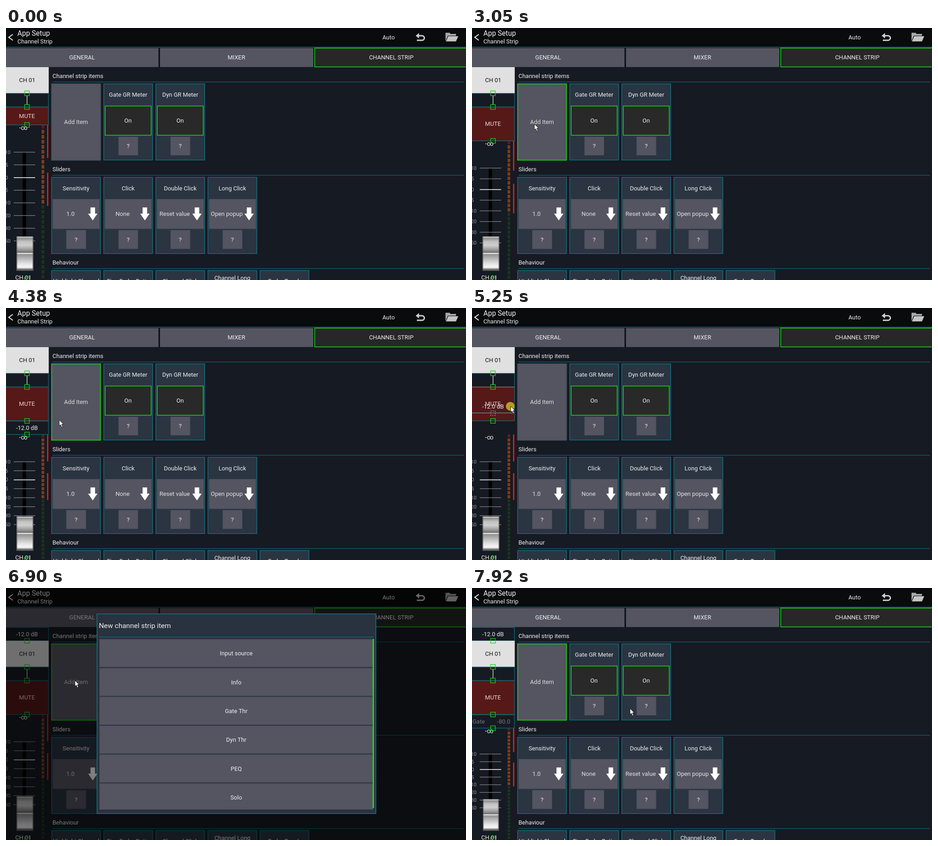
An HTML page with a canvas for the animation above (8 s loop, 1010 by 554 pixels).

```html
<!DOCTYPE html>
<html lang="en">
<head>
<meta charset="utf-8">
<title>Channel strip setup</title>
<style>
html, body { margin: 0; width: 100%; height: 100%; overflow: hidden; background: #161a22; }
canvas { display: block; }
</style>
</head>
<body>
<canvas id="stage" width="1010" height="554"></canvas>
<script>
const ctx = document.getElementById('stage').getContext('2d');
const LOOP = 8000;
const BG = '#161a22', TEAL = '#11707f', GREEN = '#14d514', BUTTON = '#555461', CARD = '#2b3441', WHITE = '#f0f0f0';

// [time, x, y] of the pointer tip
const POINTER = [
  [290, 790, 497], [690, 345, 327], [1080, 55, 216], [1160, 52, 215], [1310, 46, 213], [1550, 47, 213],
  [1790, 48, 220], [2190, 48, 248], [2340, 48, 248], [2730, 137, 211], [3200, 137, 211],
  [3680, 795, 253], [3980, 795, 253], [4380, 117, 246], [4620, 85, 264], [4860, 85, 264],
  [5480, 85, 188], [5880, 85, 101], [6190, 85, 101], [6350, 108, 155], [6580, 151, 203],
  [6900, 151, 203], [7530, 347, 265]
];
const MUTE_BOTTOM = [[1550, 213], [1790, 219.5], [2190, 248]];
const PRESSED = [[1550, 2260], [2970, 3050], [3830, 3910], [4700, 6190], [6740, 6900], [7690, 7770]];
const ROWS = ['Input source', 'Info', 'Gate Thr', 'Dyn Thr', 'PEQ', 'Solo'];
const ROWS_WITH_GAIN = ['Input source', 'Info', 'Gain', 'Gate Thr', 'Dyn Thr', 'PEQ'];

const within = (t, a, b) => t >= a && t < b;

function track(keys, t) {
  if (t <= keys[0][0]) return keys[0].slice(1);
  for (let i = 1; i < keys.length; i++) {
    const [a, b] = [keys[i - 1], keys[i]];
    if (t < b[0]) {
      const k = (t - a[0]) / (b[0] - a[0]);
      return a.slice(1).map((v, j) => v + (b[j + 1] - v) * k);
    }
  }
  return keys[keys.length - 1].slice(1);
}

function fill(x, y, w, h, color) {
  ctx.fillStyle = color;
  ctx.fillRect(x, y, w, h);
}

function box(x, y, w, h, color, border, lw = 1.4) {
  if (color) fill(x, y, w, h, color);
  if (!border) return;
  ctx.strokeStyle = border;
  ctx.lineWidth = lw;
  ctx.strokeRect(x + lw / 2, y + lw / 2, w - lw, h - lw);
}

// y is the middle of the capitals
function text(s, x, y, align = 'center', color = WHITE, size = 13) {
  ctx.font = `${size}px Roboto, sans-serif`;
  ctx.textAlign = align;
  ctx.fillStyle = color;
  ctx.fillText(s, x, Math.round(y + size * 0.355));
}

function shape(points, color) {
  ctx.beginPath();
  points.forEach(([x, y]) => ctx.lineTo(x, y));
  ctx.closePath();
  ctx.fillStyle = color;
  ctx.fill();
}

function header() {
  fill(0, 0, 1010, 42, '#0a0b0d');
  ctx.strokeStyle = WHITE;
  ctx.lineWidth = 2;
  ctx.beginPath();
  ctx.moveTo(15, 14); ctx.lineTo(6, 20.5); ctx.lineTo(15, 27);
  ctx.stroke();
  text('App Setup', 25, 11.9, 'left', WHITE, 15.6);
  text('Channel Strip', 25, 29.5, 'left');
  text('Auto', 840, 20.5);

  shape([[899.5, 17], [907, 11], [907, 23]], '#d0d0d0');
  ctx.strokeStyle = '#d0d0d0';
  ctx.lineWidth = 3;
  ctx.beginPath();
  ctx.moveTo(905, 17); ctx.lineTo(913.5, 17);
  ctx.arc(913.5, 22, 5, -Math.PI / 2, Math.PI / 2);
  ctx.lineTo(902, 27);
  ctx.stroke();

  shape([[965, 29], [965, 10.5], [974, 10.5], [976, 13], [988, 13], [988, 17], [970, 17]], '#a9a9a9');
  shape([[971, 18], [993, 18], [988, 29.5], [966, 29.5]], '#c4c4c4');

  fill(0, 42, 1010, 44, '#0c1016');
  fill(0, 41.5, 1010, 1.5, TEAL);
  box(-2, 44, 337, 42, BUTTON, '#464c58', 1);
  box(338, 44, 337, 42, BUTTON, '#464c58', 1);
  box(677, 43.5, 335, 42.8, '#272727', GREEN, 1.6);
  text('GENERAL', 167, 64.5);
  text('MIXER', 506, 64.5);
  text('CHANNEL STRIP', 846, 64.5);
}

function section(title, y) {
  text(title, 102, y, 'left');
  fill(102, y + 13, 903, 1.3, '#116270');
}

const cardX = i => 99.5 + i * 114.4;

function card(i, y, title) {
  box(cardX(i), y, 108.7, 169, CARD, TEAL);
  text(title, cardX(i) + 54.3, y + 24.5);
}

function help(i, y) {
  box(cardX(i) + 33, y, 43, 41, BUTTON, '#4a5260', 1);
  text('?', cardX(i) + 54.3, y + 20.5);
}

function settings(hover) {
  section('Channel strip items', 105);
  box(99.5, 122, 108.7, 169.3, BUTTON, hover ? GREEN : '#3b5460', hover ? 1.6 : 1);
  text('Add Item', 153.8, 206.8, 'center', '#dcdcdc');
  ['Gate GR Meter', 'Dyn GR Meter'].forEach((title, i) => {
    card(i + 1, 122, title);
    box(cardX(i + 1) + 3, 170.7, 102.6, 65.8, '#292929', GREEN, 1.6);
    text('On', cardX(i + 1) + 54, 203.5);
    help(i + 1, 239);
  });

  section('Sliders', 310);
  [['Sensitivity', '1.0'], ['Click', 'None'], ['Double Click', 'Reset value'], ['Long Click', 'Open popup']]
    .forEach(([title, value], i) => {
      const x = cardX(i);
      card(i, 327.5, title);
      box(x + 3, 376, 103, 65.5, BUTTON, '#4a5260', 1);
      text(value, x + 42, 408.8, 'center', '#e2e2e2');
      shape([[86, 394.5], [96, 394.5], [96, 408], [101.3, 408], [91, 423], [80.7, 408], [86, 408]]
        .map(p => [x + p[0], p[1]]), '#fff');
      help(i, 444.5);
    });

  section('Behaviour', 515.2);
  ['Highlight Channel', 'Fine Fader Ratio', 'Channel Click', 'Channel Long', 'Fader Touch']
    .forEach((title, i) => {
      box(cardX(i), 532.5, 108.7, 169, CARD, TEAL);
      text(title, cardX(i) + 54.3, i === 3 ? 549.5 : 556);
    });
}

function fader(top) {
  const h = 554 - top;
  const small = Math.max(0, (top - 278) / 30);
  const first = top + 60 - 3 * small;
  const last = 468 + (top - 213) * 0.128 + 3 * small;
  const step = (last - first) / 7;

  const seg = h / 31;
  for (let i = 0; i < 31; i++) {
    fill(78, top + i * seg, 6, seg * 0.74, i < 1 ? '#5c1a24' : i < 16 ? '#7c3c1c' : '#18351c');
  }
  fill(90, top, 3, h * 0.214, '#cc2019');
  fill(90, top + h * 0.308, 3, h * 0.214, '#cc2019');

  fill(36.5, first, 7.5, 520 - first, '#000');
  ['10', '5', '0', '5', '10', '20', '30', '50'].forEach((label, i) => {
    const y = first + i * step;
    fill(17, y - 0.6, 47, i === 2 ? 1.7 : 1.2, i === 2 ? '#e8e8e8' : '#8b8c90');
    text(label, label.length > 1 ? 10 : 4.5, y, 'right', '#96979b', 11);
  });

  const ky = 458.5 + 6 * small, kh = 534 - ky, kx = 23 + small, kw = 37 - 2 * small;
  const metal = ctx.createLinearGradient(0, ky, 0, ky + kh);
  [[0, '#e0e0e0'], [0.05, '#8e8e8e'], [0.15, '#c4c4c4'], [0.26, '#cecece'], [0.42, '#8a8a8a'], [0.465, '#6a6a6a'],
   [0.485, '#fff'], [0.52, '#929292'], [0.66, '#bcbcbc'], [0.8, '#e6e6e6'], [0.9, '#f6f6f6'], [0.95, '#7a7a7a'], [1, '#4a4a4a']]
    .forEach(([p, c]) => metal.addColorStop(p, c));
  fill(kx, ky, kw, kh, metal);
  fill(kx, ky, 2, kh, '#55555599');
  fill(kx + kw - 2, ky, 2, kh, '#55555599');

  text('-∞', 38, top + 6, 'center', WHITE, 14);
  text('CH 01', 38, 548.5);
  handle(553);
}

function handle(y, color = GREEN) {
  box(40.3, y - 5.6, 11.6, 11.6, null, color, 1.3);
}

function item(kind, y, h) {
  const mid = y + h / 2;
  const bg = { ch: '#e0e0e0', mute: '#571818' }[kind] || BG;
  box(-2, y, 95.8, h + 0.6, bg, kind === 'ch' ? null : TEAL, 1.2);
  if (kind === 'ch') text('CH 01', 46.5, mid, 'center', '#111');
  if (kind === 'line') fill(45.5, y + 5, 1.5, h - 10, '#c8c8c8');
  if (kind === 'mute') text('MUTE', 46, mid, 'center', '#e4dada');
  if (kind === 'gain') text('-12.0 dB', 46, mid + 0.7);
  if (kind === 'gate') {
    text('Gate', 1, mid + 0.7, 'left', '#74777d');
    text('-80.0', 84, mid + 0.7, 'right', '#74777d');
  }
}

function strip(t, pointerY) {
  const heights = { ch: 57.3, line: 30, mute: track(MUTE_BOTTOM, t)[0] - 173.3, gain: 30, gate: 30 };
  const order = ['ch', 'line', 'mute'];
  if (t >= 6190) order.unshift('gain');
  else if (t >= 3980) order.push('gain');
  if (t >= 7840) order.push('gate');
  const dragging = within(t, 4780, 6190);

  let y = 86;
  const placed = order.map(kind => {
    const p = { kind, y, h: heights[kind] };
    y += p.h;
    return p;
  });
  fill(0, 86, 95, 468, BG);
  fader(y);
  const shown = placed.filter(p => !(dragging && p.kind === 'gain'));
  shown.forEach(p => item(p.kind, p.y, p.h));
  shown.forEach(p => handle(p.y + p.h));

  if (dragging) {
    const top = Math.max(86, pointerY - 15);
    const slot = placed.reduce((a, p) => Math.abs(p.y - top) < Math.abs(a - top) ? p.y : a, 86);
    fill(0, top, 94, 30, 'rgba(22,26,34,0.06)');
    fill(0, top + 29, 94, 1.2, '#5fa3ad');
    text('-12.0 dB', 46, top + 15.5, 'center', '#f4f4f4');
    ctx.setLineDash([3, 2]);
    handle(top + 30, '#8a9a8a');
    ctx.setLineDash([]);
    fill(0, slot, 94, 1, '#d4524a');
  }
}

function dialog(rows) {
  fill(0, 0, 1010, 554, 'rgba(0,0,0,0.5)');
  box(199, 56, 614, 440.5, '#29323f', TEAL, 1.6);
  text('New channel strip item', 204, 82.5, 'left', WHITE, 15.5);
  fill(205, 107, 602, 1.3, TEAL);
  ctx.save();
  ctx.beginPath();
  ctx.rect(204, 110, 605, 377);
  ctx.clip();
  rows.forEach((label, i) => {
    const y = 112.5 + i * 63.4;
    box(205, y, 601, 61.5, BUTTON, '#454d5b', 1);
    text(label, 505.5, y + 31);
  });
  ctx.restore();
  fill(805, 112, 3, 372, '#10e010');
}

function pointer(x, y, pressed) {
  if (pressed) {
    ctx.beginPath();
    ctx.arc(x - 1, y, 9.6, 0, 7);
    ctx.fillStyle = 'rgba(228,214,30,0.7)';
    ctx.fill();
  }
  const arrow = [[0, 0], [0, 13], [3, 10.4], [5.2, 15.8], [7.6, 14.8], [5.4, 9.6], [9.2, 9.4]];
  shape(arrow.map(p => [x + p[0], y + p[1]]), '#fff');
  ctx.strokeStyle = '#111';
  ctx.lineWidth = 0.9;
  ctx.stroke();
}

function draw(t) {
  const [x, y] = track(POINTER, t);
  const firstDialog = within(t, 3120, 3980), secondDialog = within(t, 6900, 7840);
  const over = t >= 290 && within(x, 100, 208) && within(y, 122, 291);
  const hover = over || firstDialog || t >= 6900;

  fill(0, 0, 1010, 554, BG);
  header();
  settings(hover);
  strip(t, y);
  if (firstDialog) dialog(ROWS_WITH_GAIN);
  if (secondDialog) dialog(ROWS);
  if (t >= 290) pointer(x, y, PRESSED.some(([a, b]) => within(t, a, b)));
}

const start = performance.now();
function frame() {
  draw((performance.now() - start) % LOOP);
  requestAnimationFrame(frame);
}
frame();
</script>
</body>
</html>
```
